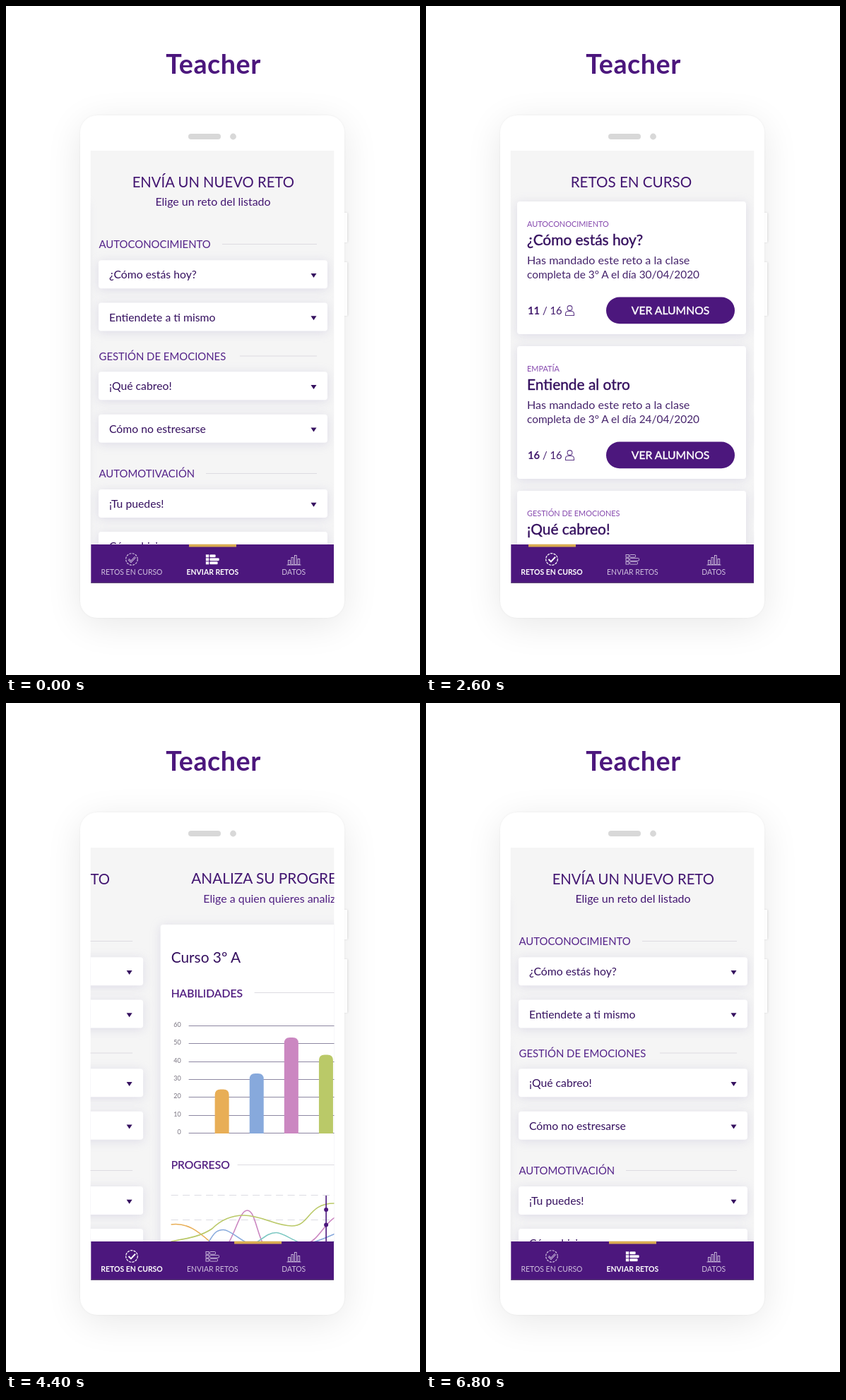
Write an HTML page that moves like this. It is 586 by 948 pixels and loops after 8000 ms.

```html
<!DOCTYPE html>
<html lang="es">
<head>
<meta charset="utf-8">
<title>Teacher</title>
<style>
  html, body { margin: 0; width: 100%; height: 100%; overflow: hidden; background: #fff; }
  svg { display: block; width: 586px; height: 948px; font-family: Lato, "Open Sans", sans-serif; }
  text { white-space: pre; }
</style>
</head>
<body>
<svg id="stage" viewBox="0 0 586 948"></svg>
<script>
const INK = '#35105f', PURPLE = '#4c177d', HEAD = '#421571', SECTION = '#55248a';

const text = (x, y, s, size, fill = INK, attrs = '') =>
  `<text x="${x}" y="${y}" font-size="${size}" fill="${fill}" ${attrs}>${s}</text>`;
const mid = (x, y, s, size, fill, attrs = '') => text(x, y, s, size, fill, `text-anchor="middle" ${attrs}`);
const medium = (color, w = .4) => `stroke="${color}" stroke-width="${w}"`;
const rect = (x, y, w, h, r, fill, attrs = '') =>
  `<rect x="${x}" y="${y}" width="${w}" height="${h}" rx="${r}" fill="${fill}" ${attrs}/>`;
const line = (x1, x2, y, color = '#dddbe1', attrs = '') =>
  `<path d="M${x1} ${y}H${x2}" stroke="${color}" ${attrs}/>`;
const curve = (d, color) => `<path d="${d}" fill="none" stroke="${color}" stroke-width="1.6"/>`;
const card = (x, y, w, h) =>
  rect(x, y + 2, w, h, 4, '#c9c6dc', 'opacity=".55" filter="url(#soft)"') + rect(x, y, w, h, 4, '#fff');

// Page: challenges in progress
function person(x, y) {
  return `<g fill="none" stroke="#5f3b88" stroke-width="1.1"><circle cx="${x}" cy="${y - 4}" r="3.4"/>
    <path d="M${x - 6} ${y + 6.5}v-2q0-4 4-4h4q4 0 4 4v2z"/></g>`;
}
function challenge(y, label, title, count, date) {
  return card(129, y, 324, 188) +
    text(143, y + 36, label, 10.9, '#8649ae') +
    text(143, y + 62, title, 20.9, INK, medium(INK)) +
    text(143, y + 89, 'Has mandado este reto a la clase', 16.1, '#46246c') +
    text(143, y + 109, `completa de 3º A el día ${date}`, 15.4, '#46246c') +
    text(144, y + 160, `<tspan font-weight="700">${count}</tspan> / 16`, 14.8, '#41196c') +
    person(203.5, y + 155) +
    rect(255, y + 135.5, 182, 37.8, 18.9, PURPLE) +
    mid(346, y + 160, 'VER ALUMNOS', 15.7, '#fff', medium('#fff'));
}
const running = mid(290.5, 257, 'RETOS EN CURSO', 20.6, HEAD) +
  challenge(277, 'AUTOCONOCIMIENTO', '¿Cómo estás hoy?', 11, '30/04/2020') +
  challenge(482, 'EMPATÍA', 'Entiende al otro', 16, '24/04/2020') +
  challenge(687, 'GESTIÓN DE EMOCIONES', '¡Qué cabreo!', 16, '20/04/2020');

// Page: send a challenge
const section = (y, s, x) => text(131.5, y + 5.5, s, 14.9, SECTION) + line(x, 440, y);
const option = (y, s) => card(131, y, 324, 40) + text(146, y + 26, s, 15.75) +
  `<path d="M431.5 ${y + 18.8}h8l-4 6z" fill="${INK}"/>`;
const send = mid(293.3, 257, 'ENVÍA UN NUEVO RETO', 20.3, HEAD) +
  mid(293, 282.5, 'Elige un reto del listado', 15.95, HEAD) +
  section(337.5, 'AUTOCONOCIMIENTO', 306) +
  option(360.3, '¿Cómo estás hoy?') + option(420.5, 'Entiendete a ti mismo') +
  section(496, 'GESTIÓN DE EMOCIONES', 331) +
  option(518.3, '¡Qué cabreo!') + option(578.7, 'Cómo no estresarse') +
  section(662.5, 'AUTOMOTIVACIÓN', 283) +
  option(685, '¡Tu puedes!') + option(745, 'Cómo hicieron');

// Page: data
const hues = { orange: '#e8ae56', blue: '#87a9dc', pink: '#cb87c1', green: '#bac968', teal: '#7cc8c2' };
const grid = [60, 50, 40, 30, 20, 10, 0].map((v, i) => {
  const y = Math.round(457 + i * 25.35) + .5;
  return line(172, 440, y, '#8d87a2') + text(161, y + 1, v, 9, '#77727f', 'text-anchor="end"');
}).join('');
const bars = [547.5, 525, 474, 498.5, 498.5].map((top, i) => {
  const x = 209 + i * 49.1;
  return `<path d="M${x} 610V${top + 8}q0-8 8-8h4q8 0 8 8V610z" fill="${Object.values(hues)[i]}"/>`;
}).join('');
const data = mid(292.5, 256, 'ANALIZA SU PROGRESO', 20.8, HEAD) +
  mid(293, 282.5, 'Elige a quien quieres analizar', 15.95, '#4f1f82') +
  card(132, 314, 324, 480) +
  text(147, 368, 'Curso 3º A', 20.9) +
  `<path d="M432 364.3h8l-4-5.6z" fill="${INK}"/>` +
  text(147, 416.5, 'HABILIDADES', 15.7, PURPLE, medium(PURPLE, .25)) + line(265, 440, 410.5) +
  grid + bars +
  text(147, 660, 'PROGRESO', 15.7, PURPLE, medium(PURPLE, .25)) + line(241, 440, 654.5) +
  [697.5, 732.5].map(y => line(147, 440, y, '#dcdce3', 'stroke-dasharray="10 6.5"')).join('') +
  curve('M147 739C170 736 185 748 205 766', hues.orange) +
  curve('M228 766C240 745 245 719 255 719S268 748 277 766M340 766C360 758 368 726 390 726C405 726 415 736 440 733', hues.pink) +
  curve('M199 766C208 750 212 746.5 221 746.5S242 759 258 767M343 766C388 752 424 730 440 703', hues.blue) +
  curve('M266 766C280 756 286 750.5 296 750.5S318 762 334 766M358 766C390 763 415 755 440 747', hues.teal) +
  curve('M147 763C175 758 190 755 205 745C222 728 240 726 250 726C275 726 295 741 318 741C344 741 340 709 378 709C405 709 420 716 440 713', hues.green) +
  `<path d="M366.5 698V770" stroke="${PURPLE}" stroke-width="1.6"/>` +
  [718, 739.5].map(y => `<circle cx="366.5" cy="${y}" r="3" fill="${PURPLE}"/>`).join('');

// Tab bar
const icons = [
  on => `<circle cx="178" cy="784" r="8.3" fill="none" stroke-width="1.2" stroke-dasharray="${on ? '3.4 1.2' : '3 1.4'}"/>
    <path d="M173.5 784l3.4 3.4 6.2-6.6" fill="none" stroke-width="${on ? 2 : 2.6}"/>` +
    (on ? '' : `<path d="M173.5 784l3.4 3.4 6.2-6.6" fill="none" stroke="${PURPLE}" stroke-width="1"/>`),
  () => [[777.5, 8], [782.5, 13], [787.5, 11]].map(([y, w]) =>
    `<rect x="283" y="${y}" width="4" height="3.6"/><rect x="288.5" y="${y}" width="${w}" height="3.6" rx="1"/>`).join(''),
  () => [[399.5, 6], [404, 10], [408.5, 13], [413, 8]].map(([x, h]) =>
    `<rect x="${x}" y="${791.5 - h}" width="2.7" height="${h}"/>`).join('') +
    '<path d="M397.5 792H417.5" stroke-width=".9"/>'
];
const names = ['RETOS EN CURSO', 'ENVIAR RETOS', 'DATOS'];
const centers = [178, 292.4, 407.3];
function tab(i, on) {
  const c = on ? '#fff' : '#cfc0de';
  const paint = `stroke="${c}" stroke-width="${on ? .3 : .9}" fill="${on ? c : 'none'}"`;
  return `<g id="tab${i}${on ? 'on' : 'off'}"><g ${paint}>${icons[i](on)}</g>` +
    mid(centers[i], 805.7, names[i], 10.45, c, on ? 'font-weight="700"' : '') + '</g>';
}

const offsets = [0, 339, 686.5];
const pages = [running, send, data].map((p, i) => `<g transform="translate(${offsets[i]})">${p}</g>`).join('');

document.getElementById('stage').innerHTML = `
  <defs>
    <filter id="soft" x="-15%" y="-80%" width="130%" height="260%"><feGaussianBlur stdDeviation="7"/></filter>
    <filter id="wide" x="-30%" y="-30%" width="160%" height="160%"><feGaussianBlur stdDeviation="26"/></filter>
    <filter id="edge" x="-200%" y="-20%" width="500%" height="140%"><feGaussianBlur stdDeviation="1.5"/></filter>
    <clipPath id="screen"><rect x="119.5" y="205" width="345" height="558.5"/></clipPath>
  </defs>
  ${rect(0, 0, 586, 948, 0, '#fff')}
  ${mid(293.5, 95.5, 'Teacher', 37.7, PURPLE, 'font-weight="700" letter-spacing=".5"')}
  ${rect(105, 165, 374, 712, 26, '#000', 'opacity=".09" filter="url(#wide)"')}
  ${[[293, 42], [363, 76]].map(([y, h]) =>
    rect(478, y, 6, h, 1, '#000', 'opacity=".1" filter="url(#edge)"') + rect(476, y, 7, h, 1, '#fff')).join('')}
  ${rect(105, 155, 374, 712, 24, '#000', 'opacity=".05" filter="url(#edge)"')}
  ${rect(105, 155, 374, 712, 24, '#fff')}
  ${rect(258, 181, 46, 8, 4, '#d8d8d8')}
  <circle cx="321.5" cy="185" r="4.4" fill="#d8d8d8"/>
  <g clip-path="url(#screen)">${rect(119.5, 205, 345, 559, 0, '#f5f5f5')}<g id="strip">${pages}</g></g>
  ${rect(120.3, 763, 343.7, 54.7, 0, PURPLE)}
  ${line(120.3, 464, 817.3, '#55406f')}
  ${[0, 1, 2].map(i => tab(i, false) + tab(i, true)).join('')}
  ${rect(0, 762.7, 67, 3.8, 0, '#d9ac52', 'id="marker"')}`;

const LOOP = 8000, FADE = 200;
const marks = [145, 259, 374];
const moves = [
  { from: 1, to: 0, start: 1552, end: 2335, swap: 2380 },
  { from: 0, to: 2, start: 3792, end: 4575, swap: 4680 },
  { from: 2, to: 1, start: 6352, end: 6743, swap: 6580 }
];
const el = id => document.getElementById(id);
const strip = el('strip'), marker = el('marker');
const tabs = [0, 1, 2].map(i => [el(`tab${i}off`), el(`tab${i}on`)]);
const clamp = v => Math.min(1, Math.max(0, v));
const smooth = p => p * p * (3 - 2 * p);

function draw(t) {
  let x = offsets[1], m = marks[1];
  const lit = [0, 1, 0];
  for (const { from, to, start, end, swap } of moves) {
    const p = clamp((t - start) / (end - start)), f = clamp((t - swap) / FADE);
    x += (offsets[to] - offsets[from]) * smooth(p);
    m += (marks[to] - marks[from]) * p;
    lit[from] -= f;
    lit[to] += f;
  }
  strip.setAttribute('transform', `translate(${-x})`);
  marker.setAttribute('x', m);
  tabs.forEach(([off, on], i) => {
    off.setAttribute('opacity', 1 - lit[i]);
    on.setAttribute('opacity', lit[i]);
  });
}

const begin = performance.now();
function frame() {
  draw((performance.now() - begin) % LOOP);
  requestAnimationFrame(frame);
}
frame();
</script>
</body>
</html>
```
